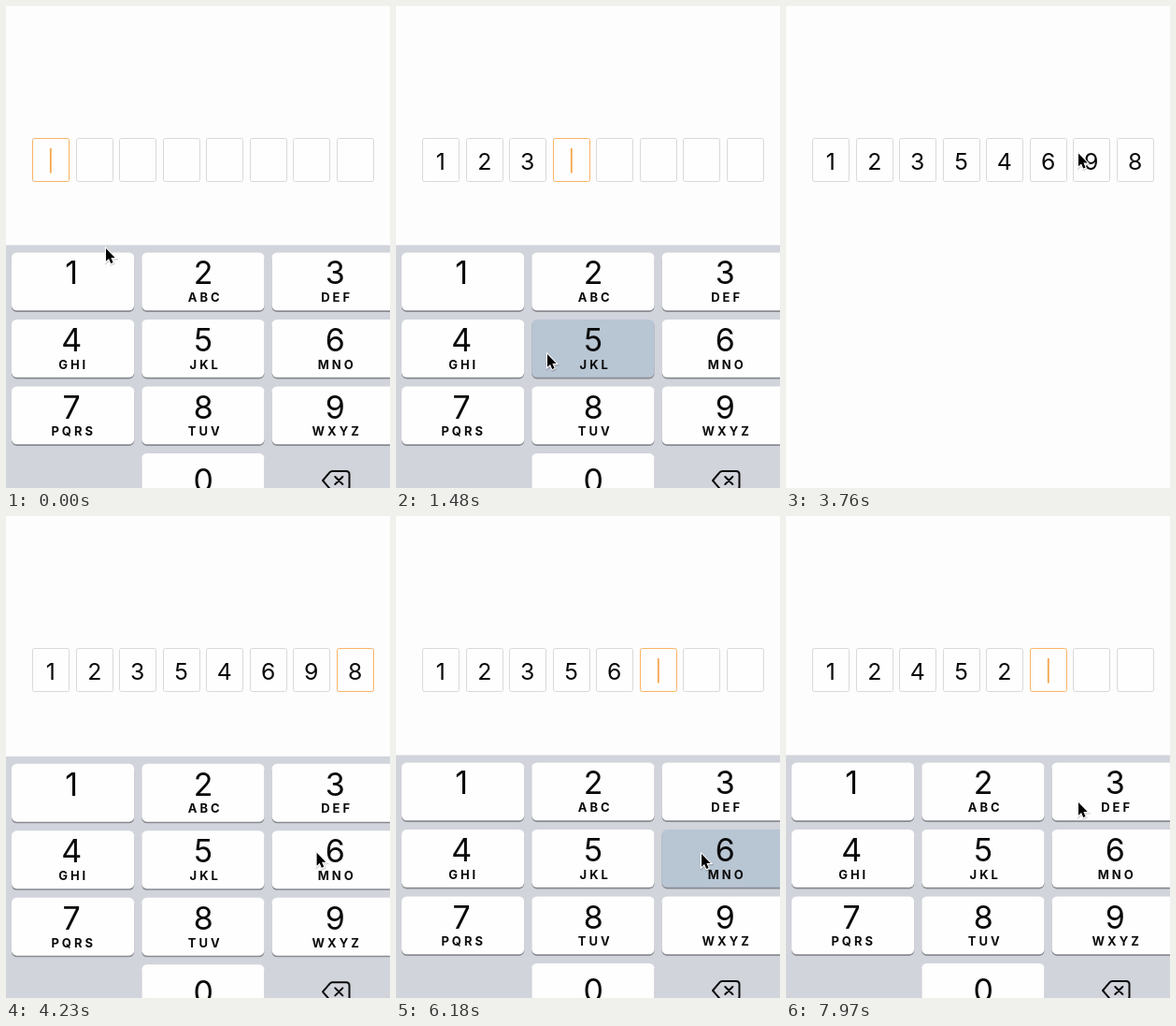
Write an HTML page that moves like this. It is 411 by 515 pixels and loops after 8 s.

```html
<!DOCTYPE html>
<html lang="en">
<head>
<meta charset="utf-8">
<title>Passcode entry</title>
<style>
html, body { margin: 0; width: 100%; height: 100%; overflow: hidden; background: #fdfdfd; }
svg { display: block; width: 100%; height: 100%; font-family: Inter, Roboto, sans-serif; }
text { text-anchor: middle; fill: #0a0a0a; }
.digit { font-size: 24.8px; }
.num { font-size: 34px; }
.abc { font-size: 13px; font-weight: 700; letter-spacing: 3px; }
.cell { fill: #fefefe; stroke: #d9d9db; }
.cell.on { stroke: #fbb366; }
</style>
</head>
<body>
<svg viewBox="0 0 411 515">
  <defs><path id="arrow" d="M0 0V13.8L3.1 10.9L5.2 16L7.6 15L5.4 10H9.7Z"/></defs>
  <rect width="411" height="515" fill="#fdfdfd"/>
  <g id="cells"></g>
  <rect id="caret" y="152" width="1.8" height="26.5" fill="#f5a54c"/>
  <g id="pad">
    <rect y="255.5" width="411" height="330" fill="#d2d4dc"/>
    <g id="keys"></g>
    <g stroke-width="2" stroke-linejoin="round" stroke-linecap="round">
      <path id="tag" d="M339 507L346.6 498.2Q347.6 497 349.2 497H364Q367.5 497 367.5 500.5V513.5Q367.5 517 364 517H349.2Q347.6 517 346.6 515.8Z" stroke="#0a0a0a"/>
      <path id="cross" d="M352.3 503L360.3 511M360.3 503L352.3 511" fill="none"/>
    </g>
  </g>
  <g id="pointer">
    <use href="#arrow" x=".5" y="1" fill="none" stroke="#000" stroke-opacity=".14" stroke-width="3"/>
    <use href="#arrow" stroke="#fff" stroke-width="2" paint-order="stroke"/>
  </g>
</svg>
<script>
const LOOP = 8000, CELLS = 8, PAD_HEIGHT = 262;
const INSERT_DELAY = 115, KEY_HOLD = 150, BACK_HOLD = 120, REST = 110;
const HIDE = 2810, SHOW = 3940;

// Evenly paced runs of taps; "<" deletes, lean shifts the aim
const runs = [
  { keys: "12354698", at: 475, gap: 318 },
  { keys: "<<<<<", at: 4705, gap: 177 },
  { keys: "56", at: 5740, gap: 325, lean: [19, -11] },
  { keys: "<<<", at: 6700, gap: 180 },
  { keys: "452", at: 7280, gap: 240 }
];
const taps = runs.flatMap(({ keys, at, gap, lean = [0, 0] }) =>
  [...keys].map((key, i) => ({ key, t: at + i * gap, lean })));

const aimX = [106, 162, 308], aimY = [291, 372, 413];
function aim({ key, lean }) {
  if (key === "<") return [346, 498];
  if (key === "8") return [aimX[1] + 66, aimY[2] + 11];
  return [aimX[(key - 1) % 3] + lean[0], aimY[Math.floor((key - 1) / 3)] + lean[1]];
}
const stop = (t, [x, y], rest = REST) => [{ t, x, y }, { t: t + rest, x, y }];
const route = [
  stop(0, [107, 259], 270),
  stop(3080, [96, 425], 170),
  stop(3760, [313, 157.5], 150),
  stop(4480, [346, 498]),
  stop(7960, [313, 306]),
  ...taps.map(tap => stop(tap.t, aim(tap)))
].flat().sort((a, b) => a.t - b.t);

const $ = id => document.getElementById(id);
function add(parent, tag, attrs, label = "") {
  const node = document.createElementNS("http://www.w3.org/2000/svg", tag);
  for (const name in attrs) node.setAttribute(name, attrs[name]);
  node.textContent = label;
  return parent.appendChild(node);
}

const cellX = i => Math.round(28 + i * 46.55) + 0.5;
const cells = Array.from({ length: CELLS }, (_, i) => ({
  box: add($("cells"), "rect", { x: cellX(i), y: 141.5, width: 39, height: 46, rx: 2, class: "cell" }),
  text: add($("cells"), "text", { x: cellX(i) + 19.2, y: 174.7, class: "digit" })
}));

const letters = " ABC DEF GHI JKL MNO PQRS TUV WXYZ".split(" ");
const keys = {};
function addKey(label, col, row) {
  const x = 6 + col * 139.3, y = 263.5 + row * 71.5, mid = 70.2 + col * 141;
  const shape = { x, width: 131.2 + 3 * (col === 2), height: 61.8, rx: 5.5 };
  add($("keys"), "rect", { ...shape, y: y + 1.6, fill: "#898b91" });
  keys[label] = add($("keys"), "rect", { ...shape, y });
  const base = label ? 297.2 + row * 71.7 : 519.3;
  add($("keys"), "text", { x: mid, y: base, class: "num" }, label);
  if (label > 1) add($("keys"), "text", { x: mid + 2, y: base + 18.8, class: "abc" }, letters[label - 1]);
}
for (let n = 1; n <= 9; n++) addKey(n, (n - 1) % 3, Math.floor((n - 1) / 3));
addKey(0, 1, 3);

const clamp = v => Math.min(1, Math.max(0, v));
const smooth = v => v * v * (3 - 2 * v);
const easeOut = v => 1 - (1 - v) ** 3;

function pointerAt(t) {
  const i = route.findIndex(p => p.t > t);
  const a = route[i - 1], b = route[i];
  const k = smooth((t - a.t) / (b.t - a.t));
  return [a.x + (b.x - a.x) * k, a.y + (b.y - a.y) * k];
}

function entryAt(t) {
  const entry = [];
  for (const tap of taps) {
    if (tap.key === "<") {
      if (t >= tap.t) entry.pop();
    } else if (t >= tap.t + INSERT_DELAY) entry.push(tap.key);
  }
  return entry;
}

function padOffset(t) {
  if (t < HIDE) return 0;
  if (t < SHOW) return PAD_HEIGHT * smooth(clamp((t - HIDE) / 300));
  return PAD_HEIGHT * (1 - easeOut(clamp((t - SHOW + 40) / 400)));
}

function draw(t) {
  const entry = entryAt(t);
  const editing = t < HIDE || t >= SHOW;
  const focus = editing ? Math.min(entry.length, CELLS - 1) : -1;
  cells.forEach(({ box, text }, i) => {
    box.classList.toggle("on", i === focus);
    text.textContent = entry[i] ?? "";
  });
  const caretOn = editing && entry.length < CELLS;
  $("caret").setAttribute("visibility", caretOn ? "visible" : "hidden");
  $("caret").setAttribute("x", cellX(Math.max(0, focus)) + 18.4);

  const held = taps.find(({ key, t: down }) =>
    t >= down && t < down + (key === "<" ? BACK_HOLD : KEY_HOLD))?.key;
  for (const label in keys) {
    keys[label].setAttribute("fill", held === label ? "#b8c5d3" : "#fefefe");
  }
  $("tag").setAttribute("fill", held === "<" ? "#0a0a0a" : "none");
  $("cross").setAttribute("stroke", held === "<" ? "#fff" : "#0a0a0a");
  $("pad").setAttribute("transform", `translate(0 ${padOffset(t)})`);
  $("pointer").setAttribute("transform", `translate(${pointerAt(t).join(" ")})`);
}

const start = performance.now();
function tick(now) {
  draw(Math.max(0, now - start) % LOOP);
  requestAnimationFrame(tick);
}
draw(0);
requestAnimationFrame(tick);
</script>
</body>
</html>
```
